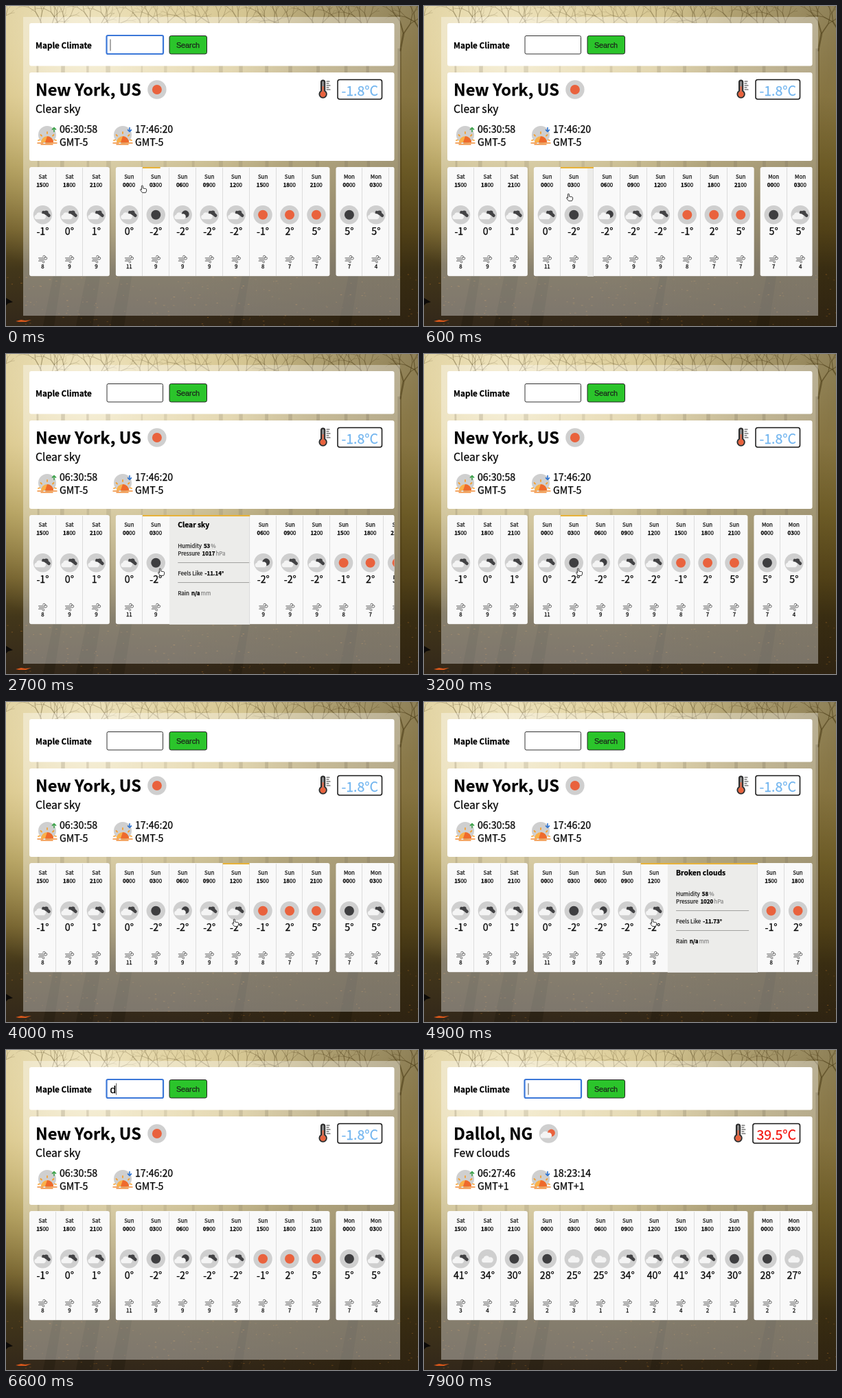
These frames come from a looping animation (600x467 px, 8 s). An HTML page with a canvas:

```html
<!DOCTYPE html>
<html lang="en">
<head>
<meta charset="utf-8">
<title>Weather forecast</title>
<style>
html, body { margin: 0; width: 100%; height: 100%; overflow: hidden; background: #3a2d18; }
canvas { display: block; width: 600px; height: 467px; }
</style>
</head>
<body>
<canvas id="stage" width="600" height="467"></canvas>
<script>
const W = 600, H = 467, LOOP = 8000;
const SANS = '"Noto Sans CJK JP", "Noto Sans CJK SC", "Noto Sans CJK", "Noto Sans", sans-serif';
const ARIAL = '"Liberation Sans", Arial, sans-serif';
const stage = document.getElementById('stage').getContext('2d');
let c = stage;

// icons: B broken clouds, C cloud, D few clouds by day, F few clouds by night, N night, S sun
const newYork = {
  title: 'New York, US', icon: 'S', sky: 'Clear sky', rise: '06:30:58', set: '17:46:20', zone: 'GMT-5',
  temp: '-1.8°C', tint: '#72b5ef', icons: 'BBBBNFBBSSSNB',
  temps: [-1, 0, 1, 0, -2, -2, -2, -2, -1, 2, 5, 5, 5],
  winds: [8, 9, 9, 11, 9, 9, 9, 9, 8, 7, 7, 7, 4]
};
const dallol = {
  title: 'Dallol, NG', icon: 'D', sky: 'Few clouds', rise: '06:27:46', set: '18:23:14', zone: 'GMT+1',
  temp: '39.5°C', tint: '#f3120c', icons: 'BCNNCCBBBBNNC',
  temps: [41, 34, 30, 28, 25, 25, 34, 40, 41, 34, 30, 28, 27],
  winds: [3, 4, 2, 2, 3, 1, 1, 2, 4, 2, 1, 2, 2]
};
const panels = [
  { col: 4, open: 520, close: 2600, title: 'Clear sky', hum: '53', pres: '1017', feels: '-11.14°' },
  { col: 7, open: 4050, close: 5100, title: 'Broken clouds', hum: '58', pres: '1020', feels: '-11.73°' }
];
// column, pointer enters, pointer leaves
const hovers = [[4, -165, 3460], [5, 3460, 3600], [6, 3600, 3740], [7, 3740, 5560]];
const pointer = [
  [0, 200, 267], [450, 212, 279], [900, 212, 279], [1700, 345, 295], [1950, 345, 295],
  [2500, 226, 318], [3250, 226, 318], [3900, 334, 322], [5350, 334, 322], [6050, 186, 57], [8000, 186, 57]
];

const clamp = v => Math.max(0, Math.min(1, v));
const smooth = v => (v = clamp(v), v * v * (3 - 2 * v));

function text(str, x, y, size, color = '#000', weight = 400, align = 'left', family = SANS) {
  c.font = `${weight} ${size}px ${family}`;
  c.fillStyle = c.strokeStyle = color;
  c.textAlign = align;
  c.lineWidth = .25;
  c.fillText(str, x, y);
  c.strokeText(str, x, y);
  return c.measureText(str).width;
}
function box(x, y, w, h, r, fill, stroke, lw = 1) {
  c.beginPath();
  c.roundRect(x, y, w, h, r);
  if (fill) { c.fillStyle = fill; c.fill(); }
  if (stroke) { c.strokeStyle = stroke; c.lineWidth = lw; c.stroke(); }
}
function dot(x, y, r, fill) {
  c.beginPath();
  c.arc(x, y, r, 0, 7);
  c.fillStyle = fill;
  c.fill();
}
function path(d, x, y, fill, stroke, lw = 1) {
  const p = new Path2D(d);
  c.save();
  c.translate(x, y);
  c.lineCap = c.lineJoin = 'round';
  if (fill) { c.fillStyle = fill; c.fill(p); }
  if (stroke) { c.strokeStyle = stroke; c.lineWidth = lw; c.stroke(p); }
  c.restore();
}

function makeForest() {
  const canvas = document.createElement('canvas');
  canvas.width = W;
  canvas.height = H;
  c = canvas.getContext('2d');
  let seed = 11;
  const rnd = () => (seed = seed * 16807 % 2147483647) / 2147483647;
  const fade = (g, stops) => {
    stops.forEach(([at, color]) => g.addColorStop(at, color));
    c.fillStyle = g;
    c.fillRect(0, 0, W, H);
  };
  fade(c.createLinearGradient(0, 0, 0, H), [[0, '#c8b987'], [.28, '#bfa966'], [.5, '#96813b'],
    [.7, '#6a5723'], [.82, '#43371a'], [1, '#32271a']]);
  fade(c.createRadialGradient(120, 60, 10, 120, 60, 330),
    [[0, 'rgba(255,247,218,.75)'], [.45, 'rgba(252,238,190,.45)'], [1, 'rgba(250,235,180,0)']]);
  fade(c.createLinearGradient(350, 0, W, 60), [[0, 'rgba(40,28,4,0)'], [1, 'rgba(40,28,4,.38)']]);

  function branch(x, y, len, angle, width) {
    if (len < 5) return;
    const x2 = x + len * Math.cos(angle), y2 = y + len * Math.sin(angle);
    c.lineWidth = width;
    c.beginPath();
    c.moveTo(x, y);
    c.lineTo(x2, y2);
    c.stroke();
    branch(x2, y2, len * .76, angle - .2 - rnd() * .35, width * .68);
    branch(x2, y2, len * .68, angle + .2 + rnd() * .4, width * .6);
  }
  for (let i = 0; i < 17; i++) {
    const x = i * 38 - 6 + rnd() * 18, edge = Math.abs(x - 220) / 380;
    c.strokeStyle = `rgba(66,50,14,${.16 + edge * .25})`;
    c.lineWidth = 2 + rnd() * 5;
    c.beginPath();
    c.moveTo(x, 380);
    c.lineTo(x + rnd() * 8 - 4, 62);
    c.stroke();
    c.strokeStyle = `rgba(66,50,14,${.28 + edge * .25})`;
    branch(x, 66, 26, -Math.PI / 2 + rnd() * .5 - .25, 2.8);
  }
  // long reflections on the wet ground
  for (const [x, w] of [[70, 12], [118, 20], [168, 16], [345, 10], [500, 14]]) {
    c.fillStyle = 'rgba(22,18,10,.28)';
    c.beginPath();
    c.moveTo(x, 388);
    c.lineTo(x + w, 388);
    c.lineTo(x + w - 12, H);
    c.lineTo(x - 16, H);
    c.fill();
  }
  for (let i = 0; i < 200; i++) {
    c.fillStyle = `rgba(180,115,40,${.15 + rnd() * .35})`;
    c.fillRect(rnd() * W, 388 + rnd() * 78, 1 + rnd() * 2, 1);
  }
  path('M0 -5 L10 1 L3 3 L0 6 Z', 0, 431, '#0c0a08');
  path('M14 460 l8 -2 l6 1 l9 -1 l-8 3 l-10 0 Z', 0, 0, '#d8571b');
  c.fillStyle = 'rgba(255,255,255,.36)';
  c.fillRect(25, 16, 549, 436);
  c = stage;
  return canvas;
}
const forest = makeForest();

const cloudShape = 'M-6 4.5 a3.3 3.3 0 0 1 -.5 -6.5 a4.7 4.7 0 0 1 8.5 -1.2 a3.9 3.9 0 0 1 3 7.7 Z';
function skyIcon(kind, x, y) {
  dot(x, y, 13.7, '#cfcfcf');
  if (kind === 'S') return dot(x, y, 7, '#e9623d');
  if (kind === 'N') return dot(x, y, 7, '#3e3e40');
  if (kind === 'C') return path(cloudShape, x + .7, y + 1, '#f4f4f4');
  if (kind === 'B') {
    path('M1 -3.5 L5 -2.5 L9 1', x, y, null, '#434345', 4.6);
    dot(x + 5, y - 3, 3.2, '#434345');
  } else {
    dot(x + 4, y - 1, 5.4, kind === 'D' ? '#e9623d' : '#3e3e40');
  }
  path(cloudShape, x - 3, y + 2, '#f4f4f4');
}
function windIcon(x, y) {
  path('M-6 -1.5 H2 a1.8 1.8 0 1 0 -1.8 -2 M-5 .7 H4.5 a1.8 1.8 0 1 0 -1.8 -2 M-6 2.8 H1 a1.4 1.4 0 1 1 -1.4 1.6',
    x, y, null, '#555', .9);
}
function horizonIcon(x, rising) {
  dot(x, 188, 13, '#cfcfcf');
  path('M-13 -1 L-11 -1.5 M-9.5 -9 L-8 -7.5 M0 -13 V-11 M9.5 -9 L8 -7.5 M13 -1 L11 -1.5', x, 197, null, '#f5a030', 1.8);
  path('M-9 2 a9 9 0 0 1 18 0 Z', x, 197, '#f9b04a');
  path('M0 -7 a9 9 0 0 1 9 9 H-3 Z', x, 197, '#ee6a2c');
  path('M-14 3 H-6 M-2 3 H14 M-9 5 H8', x, 197, null, '#f08a35', 1.5);
  const color = rising ? '#3fa34d' : '#2f74d0', s = rising ? 1 : -1;
  path(`M0 ${3 * s} V${-3 * s} M-2.5 ${-.4 * s} L0 ${-3 * s} L2.5 ${-.4 * s}`, x + 10, 180.5, null, color, 1.6);
}
function thermometer(x) {
  path('M-4 17 V4 a2.6 2.6 0 0 1 5.2 0 V17 a5.2 5.2 0 1 1 -5.2 0 Z', x, 107, '#8a8a8a', '#2b2b2b', 2);
  dot(x - 1.4, 128.7, 4, '#e9623d');
  path('M-1.4 11 V21', x, 107, null, '#e9623d', 2);
  path('M4 3 H8 M4 6 H7 M4 9 H9 M4 12 H7 M4 15 H9', x, 107, null, '#333', 1.2);
}

function drawHeader(t) {
  box(34, 25, 531.5, 62.5, 3, '#fff');
  text('Maple Climate', 43, 61.5, 11.7, '#000', 700);
  const focused = t < 480 || t >= 6150;
  if (focused) box(146.5, 43, 82.5, 27, 2, '#fff', '#3b77d8', 2.2);
  else box(147, 43.5, 81.5, 26.5, 2, '#fff', '#333');
  const count = t < 7450 ? Math.max(0, Math.min(6, Math.floor((t - 6500) / 100))) : 0;
  const typed = text('dallol'.slice(0, count), 151.5, 62.5, 15.5, '#000', 400, 'left', ARIAL);
  if (focused) {
    c.fillStyle = '#555';
    c.fillRect(151.5 + typed, 48.5, 1, 17);
  }
  box(238, 43.5, 54.5, 26.5, 2.5, '#2bc42b', '#222');
  text('Search', 265, 61, 10.8, '#1c241c', 400, 'center', ARIAL);
}
function drawCity(city) {
  box(34, 97, 531.5, 129, 3, '#fff');
  const w = text(city.title, 43, 131.3, 23.6, '#000', 700);
  skyIcon(city.icon, 43 + w + 23, 122);
  text(city.sky, 43, 155.5, 15.7);
  horizonIcon(60, true);
  horizonIcon(170, false);
  [[78, city.rise], [188, city.set]].forEach(([x, clock]) => {
    text(clock, x, 185.3, 14.2);
    text(city.zone, x, 204.3, 14.2);
  });
  const tw = text(city.temp, 542, 130.5, 19.5, city.tint, 400, 'right');
  const left = 542 - tw - 5.5;
  box(left, 107.5, 547.5 - left, 28.5, 3, null, '#161616', 1.5);
  thermometer(left - 20);
}

function drawDetail(p, x, w) {
  c.save();
  c.beginPath();
  c.rect(x, 235, w, 160);
  c.clip();
  c.fillStyle = '#ececea';
  c.fillRect(x, 235, w, 160);
  const left = x + 12.5;
  const row = (label, value, unit, y) => {
    let pen = left + text(label, left, y, 8, '#222') + 3;
    pen += text(value, pen, y, 8, '#000', 700) + 1;
    text(unit, pen, y, 8, '#888');
  };
  text(p.title, left, 253, 10.3, '#000', 700);
  row('Humidity', p.hum, '%', 283);
  row('Pressure', p.pres, 'hPa', 294);
  row('Feels Like', p.feels, '', 323);
  row('Rain', 'n/a', 'mm', 352);
  c.fillStyle = '#a2a2a0';
  c.fillRect(left, 304, 106, 1);
  c.fillRect(left, 333, 106, 1);
  c.restore();
}
function drawForecast(city, t) {
  const COL = 38.95, GAP = 9;
  const widthOf = i => {
    const p = panels.find(q => q.col === i);
    return p ? 131.5 * (smooth((t - p.open) / 500) - smooth((t - p.close) / 500)) : 0;
  };
  c.save();
  c.beginPath();
  c.roundRect(34, 234.8, 531.5, 160, 3);
  c.clip();
  let x = 34;
  [['Sat', 0, 3], ['Sun', 3, 11], ['Mon', 11, 19]].forEach(([day, first, end]) => {
    let width = (end - first) * COL;
    for (let i = first; i < end; i++) width += widthOf(i);
    box(x, 235, width, 159.3, 3, '#f9f9f9');
    for (let i = first; i < end; i++) {
      const extra = widthOf(i), mid = x + COL / 2;
      if (i < city.temps.length) {
        const hour = String(i < 3 ? 15 + i * 3 : (i - 3) * 3 % 24).padStart(2, '0');
        text(day, mid, 252.3, 7.9, '#111', 400, 'center');
        text(hour, mid, 263.6, 7.9, '#000', 700, 'right');
        text('00', mid, 263.6, 7.9, '#111');
        skyIcon(city.icons[i], mid, 304.7);
        text(city.temps[i] + '°', mid, 333.9, 14.2, '#000', 400, 'center');
        windIcon(mid, 369.3);
        text(city.winds[i], mid, 383.3, 7.9, '#000', 400, 'center');
      }
      if (extra > .1) drawDetail(panels.find(p => p.col === i), x + COL, extra);
      if (i < end - 1) {
        c.fillStyle = '#dcdcdc';
        c.fillRect(Math.round(x + COL + extra) - 1, 236, 1, 158);
      }
      const hover = hovers.find(h => h[0] === i);
      if (hover) {
        const grown = Math.min(clamp((t - hover[1]) / 250), clamp((hover[2] + 250 - t) / 250));
        c.fillStyle = '#e8b238';
        c.fillRect(x, 234.8, (COL + extra) * grown, 2.2);
      }
      x += COL + extra;
    }
    x += GAP;
  });
  c.restore();
}

function drawPointer(t) {
  if (t >= 6500) return;
  const i = pointer.findIndex(p => p[0] > t);
  const [t0, x0, y0] = pointer[i - 1], [t1, x1, y1] = pointer[i];
  const k = smooth((t - t0) / (t1 - t0));
  const x = x0 + (x1 - x0) * k, y = y0 + (y1 - y0) * k;
  if (y < 72) path('M-2 -6 L0 -5 L2 -6 M0 -5 V5 M-2 6 L0 5 L2 6', x, y, null, '#333', 1);
  else path('M-2.6 1 V-4 a1 1 0 0 1 2 0 V-1 L3.6 -.4 a1.2 1.2 0 0 1 1 1.2 V3 L3.4 5.4 H-1.4 L-4.4 1.6 a.9 .9 0 0 1 1.8 -.6 Z',
    x, y, '#fff', '#222', .9);
}

function frame(now) {
  const t = now % LOOP;
  const city = t < 7600 ? newYork : dallol;
  c.drawImage(forest, 0, 0);
  drawHeader(t);
  drawCity(city);
  drawForecast(city, t);
  drawPointer(t);
  requestAnimationFrame(frame);
}
requestAnimationFrame(frame);
</script>
</body>
</html>
```
